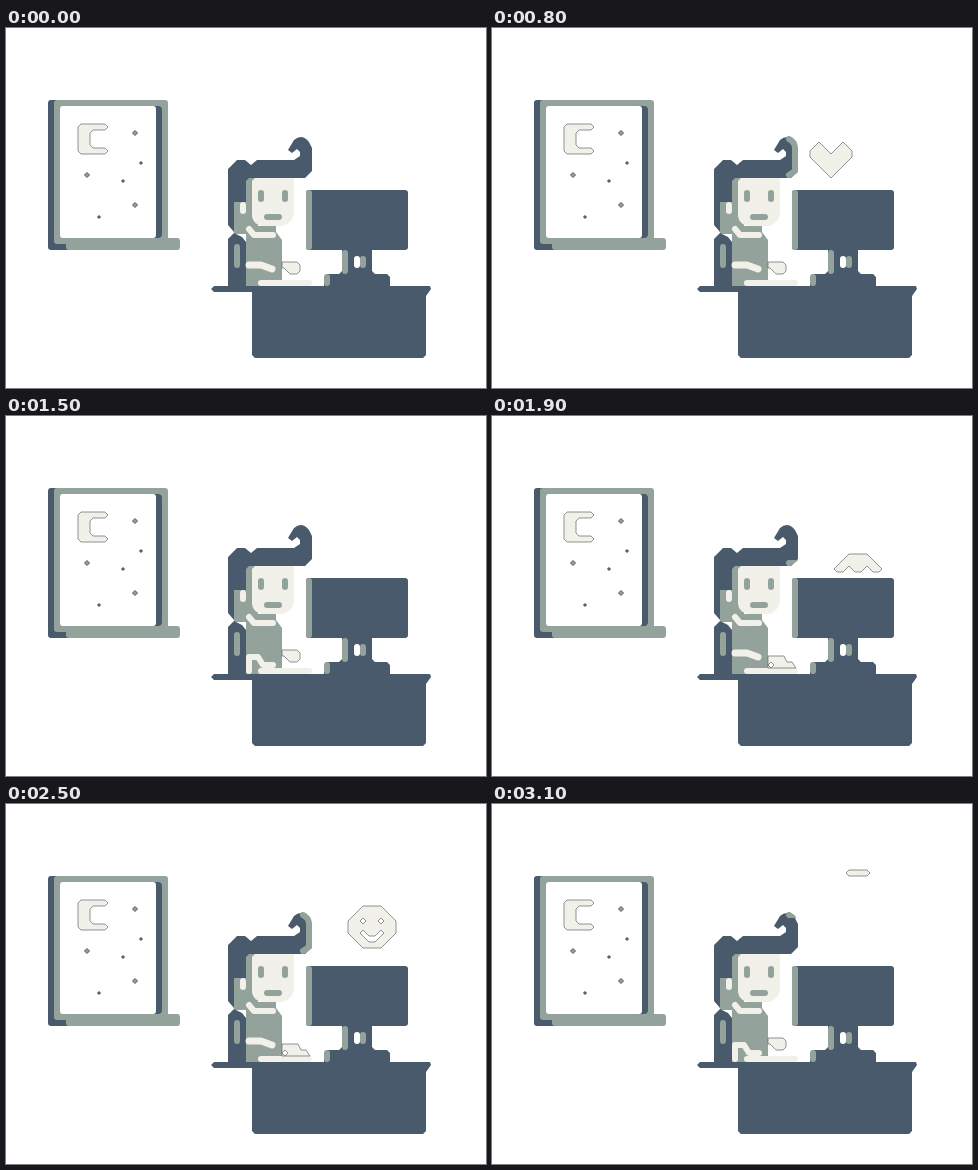
An HTML page for the animation above (3200 ms loop, 480x360 px).

```html
<!DOCTYPE html>
<html lang="en">
<head>
<meta charset="utf-8">
<title>Late night desk</title>
<style>
html, body { margin: 0; width: 100%; height: 100%; overflow: hidden; background: #fff; }
svg { display: block; width: 100vw; height: 100vh; }
</style>
</head>
<body>
<svg id="stage" viewBox="0 0 480 360"></svg>
<script>
const CELL = 6, STEP = 100, LOOP = 3200, HORIZON = 26;
const BLUE = '#4a5a6d', GRAY = '#93a39c', LIGHT = '#f1f1e9', WHITE = '#fff', EDGE = '#62666a';
const stage = document.getElementById('stage');

function add(tag, attrs, parent = stage) {
  const el = document.createElementNS('http://www.w3.org/2000/svg', tag);
  for (const key in attrs) el.setAttribute(key, attrs[key]);
  parent.append(el);
  return el;
}
const rect = (x, y, width, height, fill, rx = 3) => add('rect', { x, y, width, height, fill, rx });
const path = (d, fill) => add('path', { d, fill });
const lined = d => add('path', { d, fill: LIGHT, 'fill-rule': 'evenodd', stroke: EDGE, 'stroke-width': 0.7 });
const band = (d, stroke, width) => add('path', {
  d, stroke, fill: 'none', 'stroke-width': width, 'stroke-linecap': 'round', 'stroke-linejoin': 'round'
});
const show = (el, on) => el.setAttribute('visibility', on ? 'visible' : 'hidden');

// Cut each corner by half a cell, so that stairs become slopes.
function chamfer(points) {
  const cut = ([x, y], [u, v]) =>
    [x + Math.sign(u - x) / 2, y + Math.sign(v - y) / 2].map(k => k * CELL).join();
  const n = points.length;
  return 'M' + points.map((p, i) =>
    cut(p, points[(i + n - 1) % n]) + 'L' + cut(p, points[(i + 1) % n])).join('L') + 'Z';
}

// Outline of the cells of a width x height block for which test(x, y) holds.
function trace(test, width, height, left, top) {
  const filled = (x, y) => x >= 0 && y >= 0 && x < width && y < height && test(x, y);
  const edges = {};
  const edge = (x, y, u, v) => (edges[[x, y]] ||= []).push([u, v]);
  for (let y = 0; y < height; y++) {
    for (let x = 0; x < width; x++) {
      if (!filled(x, y)) continue;
      if (!filled(x, y - 1)) edge(x, y, x + 1, y);
      if (!filled(x + 1, y)) edge(x + 1, y, x + 1, y + 1);
      if (!filled(x, y + 1)) edge(x + 1, y + 1, x, y + 1);
      if (!filled(x - 1, y)) edge(x, y + 1, x, y);
    }
  }
  const turn = (a, b, c) => (b[0] - a[0]) * (c[1] - b[1]) - (b[1] - a[1]) * (c[0] - b[0]);
  let d = '';
  for (const key in edges) {
    if (edges[key].length !== 1) continue;
    const loop = [key.split(',').map(Number)];
    do {
      const [b, a] = [loop.at(-1), loop.at(-2)];
      const exits = edges[b];
      // Where two cells touch at a corner, stay with the same cell.
      const pick = a ? Math.max(0, exits.findIndex(c => turn(a, b, c) > 0)) : 0;
      loop.push(exits.splice(pick, 1)[0]);
    } while (String(loop.at(-1)) !== key);
    loop.pop();
    const n = loop.length;
    const corners = loop.filter((b, i) => turn(loop[(i + n - 1) % n], b, loop[(i + 1) % n]));
    d += chamfer(corners.map(([x, y]) => [x + left, y + top]));
  }
  return d;
}

// Window
rect(42, 72, 24, 150, BLUE);
rect(48, 72, 114, 144, GRAY);
rect(60, 210, 114, 12, GRAY);
rect(140, 78, 16, 132, BLUE, 4);
rect(54, 78, 96, 132, WHITE);
lined(trace((x, y) => x < 2 || y % 4 === 0, 5, 5, 12, 16));

const star = (x, y, r, fill) => add('path', {
  d: `M${x - r},${y}l${r},${-r}l${r},${r}l${-r},${r}Z`, fill, stroke: BLUE
});
for (const [x, y] of [[129, 105], [81, 147], [129, 177]]) star(x, y, 2.5, GRAY);
for (const [x, y] of [[135, 135], [117, 153], [93, 189]]) star(x, y, 1.5, BLUE);

// Head and body
path('M228,174H252V198H270V204L276,212V258H240V206H228Z', GRAY);
path('M222,141L231,132H239L245,137L251,132H288L294,128V124L291,121L286,125L282,122' +
  'L288,112Q296,105 303,114L306,120V143L299,150H246V174H228V204L222,197Z', BLUE);
path('M240,153L243,150H252V198L240,190Z', GRAY);
path('M246,153L249,150H288V186Q286,196 276,198H256Q247,196 246,188Z', LIGHT);
rect(234, 174, 6, 12, LIGHT);
band('M243,201L248,207H267', LIGHT, 6);
const eyes = [252, 276].map(x => rect(x, 162, 6, 12, GRAY));
rect(258, 186, 18, 6, GRAY);

// Back, sleeve and the two forearm poses
path('M222,211L228,205L236,209L240,214V258H222Z', BLUE);
rect(228, 216, 6, 24, GRAY);
const reach = band('M243,237H255L266,241', LIGHT, 7);
const rest = band('M243,255V241H252L257,249H267', LIGHT, 6);
rect(252, 252, 54, 6, LIGHT);
const handUp = lined('M276,234H291L294,237V243L291,246H284L278,240H276Z');
const handDown = lined('M276,240H292L295,246H300L304,252H276Z M279,246l-3,3l3,3l3,-3Z');

// Monitor and desk
rect(300, 162, 102, 60, BLUE);
rect(300, 162, 6, 60, GRAY);
path('M336,222H366V243L369,246H381L384,249V258H318V249L321,246H333L336,243Z', BLUE);
rect(336, 222, 6, 24, GRAY);
rect(318, 246, 6, 12, GRAY);
rect(348, 228, 6, 12, WHITE);
rect(354, 228, 6, 12, GRAY);
path('M208,258H424L425,261L420,268V327L417,330H249L246,327V264H208L205,261Z', BLUE);

// Light from the icons climbs along the edge of the hair.
const clip = add('clipPath', { id: 'glow' });
const glows = [26, 43].map(start =>
  ({ start, el: add('rect', { x: 282, width: 30, height: 7 * CELL }, clip) }));
band('M297,111Q303,114 303,120V143L297,147', GRAY, 6).setAttribute('clip-path', 'url(#glow)');

// Each icon rises one cell per step over the horizon and is eaten from below.
const heart = (x, y) => {
  const c = Math.abs(x - 3);
  return c + y <= 5 && y >= Math.abs(c - 2);
};
const smiley = (x, y) => {
  const c = Math.abs(x - 3.5), r = y - 3;
  const eye = c === 1.5 && r === -1;
  const mouth = r > 0 && c + r === 2.5;
  return c + Math.abs(r) <= 4.5 && !eye && !mouth;
};
const icons = [
  { test: heart, width: 7, height: 6, left: 53, start: 27, end: 15 },
  { test: smiley, width: 8, height: 7, left: 57, start: 42, end: 32 }
];
for (const icon of icons) icon.el = lined('');

const isUp = beat => [0, 2, 4, 7].includes(beat);

function draw(ms) {
  const n = Math.floor((ms % LOOP) / STEP);
  const beat = n % 8;
  show(handUp, isUp(beat));
  show(handDown, !isUp(beat));
  show(reach, beat < 6);
  show(rest, beat >= 6);
  for (const eye of eyes) show(eye, n !== 27);
  for (const { start, el } of glows) el.setAttribute('y', (start - n) * CELL);
  for (const { test, width, height, left, start, end, el } of icons) {
    const top = start - n;
    const rows = Math.min(height, HORIZON - top, end - n);
    el.setAttribute('d', trace(test, width, rows, left, top));
  }
}

const begin = performance.now();
function tick() {
  draw(Math.max(0, performance.now() - begin));
  requestAnimationFrame(tick);
}
tick();
</script>
</body>
</html>
```
